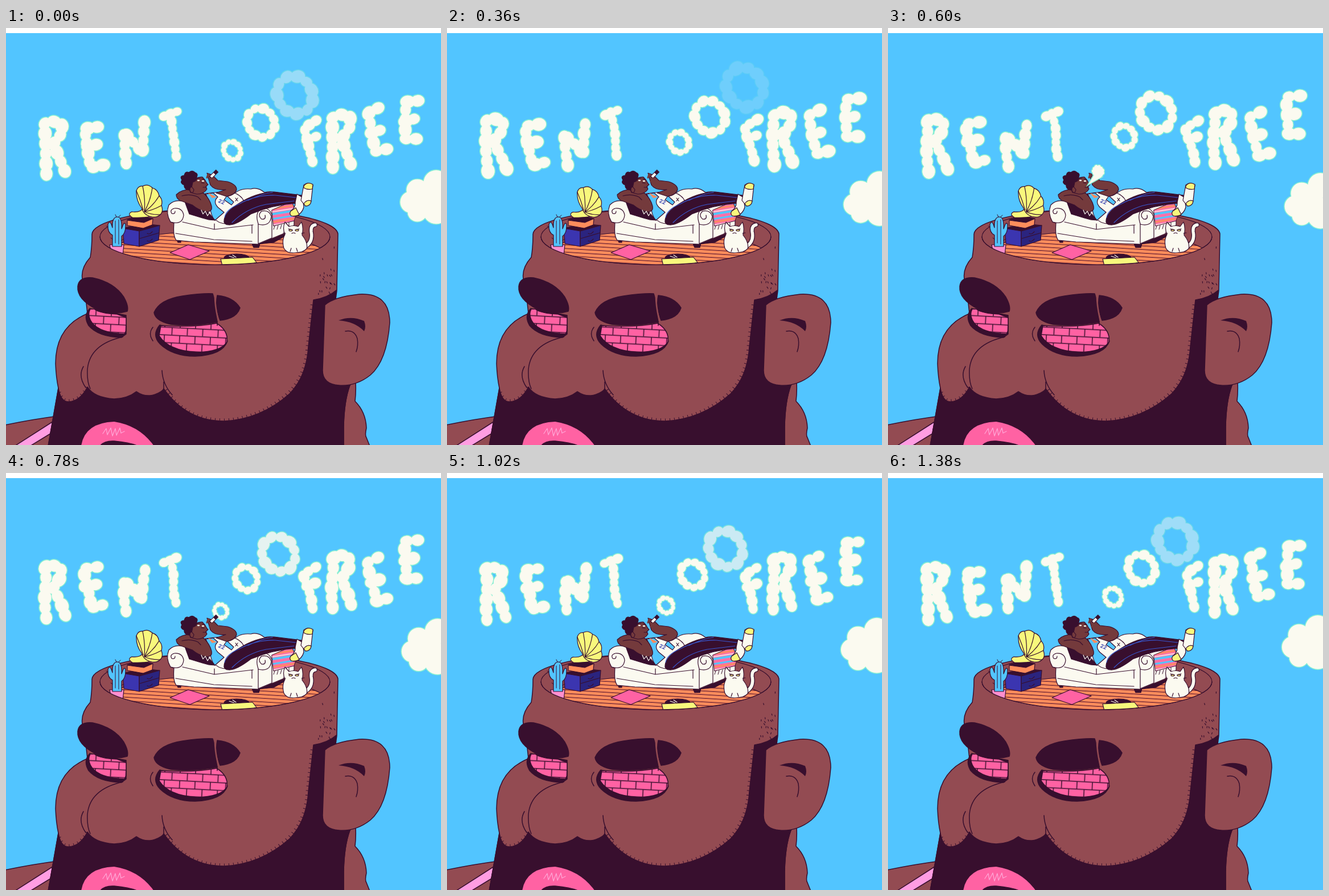
An HTML page for the animation above (1.44 s loop, 764x733 px).

```html
<!DOCTYPE html>
<html lang="en">
<head>
<meta charset="utf-8">
<title>Rent free</title>
<style>
html, body { margin: 0; width: 100%; height: 100%; overflow: hidden; background: #fff }
svg { display: block; width: 764px; height: 733px }
.art { stroke: #380f2e; stroke-width: 1.5; stroke-linejoin: round; stroke-linecap: round; fill: none }
.room { stroke-width: 1.2 }
.skin { fill: #934b52 } .dark { fill: #380f2e } .cream { fill: #fbfaf0 } .pink { fill: #ff62a3 }
.yellow { fill: #f8f87c } .blue { fill: #52c5ff } .orange { fill: #ff8d5c } .navy { fill: #3b35b0 }
.arm { fill: #743a3c }
.flat { stroke: none }
.smoke path { fill: #fbfaf0; stroke: #86efd2; stroke-width: 3; paint-order: stroke }
</style>
</head>
<body>
<svg viewBox="0 0 764 733">
<defs>
  <pattern id="boards" width="40" height="6.4" patternUnits="userSpaceOnUse" patternTransform="rotate(3.5)">
    <path d="M0 0H40V6.4H0Z" fill="#ff8d5c"/><path d="M0 3H40" stroke="#6b2536" stroke-width="1.3"/>
  </pattern>
  <pattern id="bricks" x="273" y="514" width="27" height="27" patternUnits="userSpaceOnUse" patternTransform="rotate(3 329 545)">
    <path d="M0 0H27V27H0Z" fill="#ff62a3"/>
    <path d="M0 1H27M0 14.500H27M5 1V14.500M18 14.500V27" stroke="#380f2e" stroke-width="1.5"/>
  </pattern>
  <pattern id="stripes" width="30" height="23" y="311" patternUnits="userSpaceOnUse" patternTransform="rotate(-9 468 318)">
    <path d="M0 0H30V23H0Z" fill="#ff70a8"/>
    <path d="M0 1H30M0 16H30" stroke="#52c5ff" stroke-width="4"/>
    <path d="M0 7H30" stroke="#ff8d5c" stroke-width="3"/>
    <path d="M0 12H30" stroke="#fbfaf0" stroke-width="1.5"/>
  </pattern>
  <clipPath id="opening"><path d="M165 300H569V367A202 49 0 0 1 165 367Z"/></clipPath>
</defs>
<path d="M0 9H764V733H0Z" fill="#52c5ff"/>
<g class="smoke" id="back"></g>

<g class="art">
  <!-- shoulders and neck -->
  <path class="skin" d="M-2 698Q45 688 92 682V736H-2Z"/>
  <path d="M15 735L82 692L78 713L42 735Z" fill="#ff9de2"/>
  <path class="skin" d="M614 622Q615 640 613 656Q632 675 633 703Q630 716 633 720L639 735H580V640Z"/>

  <!-- head -->
  <path class="skin" d="M151 364Q151 385 148 403Q131 422 134 441Q140 470 143 502Q87 525 87 590Q88 615 92 633L74 735H593V700Q594 655 604 628L560 620L581 462L583 362A216 45 0 0 0 151 364Z"/>
  <path class="dark" d="M92 633Q96 657 110 657Q130 656 143 631Q155 650 190 652Q214 651 229 639Q245 650 262 644Q275 639 277 634Q317 691 383 691Q447 688 498 643Q528 612 531 560L540 478Q565 474 580 461L562 600L604 628Q594 655 593 700V735H74Z"/>
  <path d="M94 640Q99 655 110 655Q130 654 142 631M281 636Q317 689 383 689Q447 686 496 641Q526 610 529 560L538 480" stroke-width="5" stroke-dasharray="1 7" stroke-linecap="butt"/>
  <g id="stubble" stroke-width="1.2"></g>

  <path class="skin" d="M560 487Q575 473 620 468Q674 465 674 518Q669 585 640 610Q615 630 585 628Q556 626 556 602Q558 540 560 487Z"/>
  <path class="dark flat" d="M584 514Q606 505 629 515Q633 525 629 533Q613 516 584 514Z"/>
  <path d="M596 533Q612 530 617 546Q619 558 615 569"/>

  <path class="dark" d="M147 493Q135 506 145 523Q162 543 203 544L211 538V505Z"/>
  <path fill="url(#bricks)" d="M148 494Q142 505 151 518Q165 536 208 538L211 532V509L195 503Q165 502 155 494Z"/>
  <path class="dark" d="M126 454Q128 437 152 439Q190 447 207 473Q216 489 213 498Q190 505 160 495Q124 477 126 454Z"/>
  <path class="dark" d="M270 522Q255 540 271 556Q293 577 332 577Q381 575 389 550Z"/>
  <path fill="url(#bricks)" d="M272 523Q330 527 370 519Q391 532 388 552Q378 569 335 570Q285 567 269 541Z"/>
  <path class="dark" d="M260 500Q270 477 310 471Q345 466 363 467Q371 490 371 517Q330 525 290 521Q262 515 260 500Z"/>
  <path class="dark" d="M371 470Q400 473 411 492Q405 511 376 514Q367 490 371 470Z"/>
  <path d="M367 466Q366 485 373 515" stroke="#934b52" stroke-width="2.5"/>
  <path d="M371 516V523M258 526Q249 537 258 550M136 595Q126 612 140 632M205 543Q147 556 143 600Q142 622 148 634M274 602Q275 626 292 645M277 634V622"/>
  <path class="pink flat" d="M132 735Q138 694 190 692Q235 699 260 735Z"/>
  <path class="dark" d="M165 735Q172 725 190 726Q220 729 232 735Z"/>
  <path d="M170 713L176 704L178 715L184 703L187 717L192 704L194 716L200 703L202 712L208 709" stroke="#ffa5d5" stroke-width="1.300"/>
</g>

<g class="art room">
  <ellipse class="skin" cx="367" cy="367" rx="202" ry="49"/>
  <g clip-path="url(#opening)">
    <ellipse cx="367" cy="405" rx="200" ry="48" fill="url(#boards)"/>
    <path class="pink" d="M288 395L320 381L357 392L323 407Z"/>
    <ellipse class="dark" cx="405" cy="404" rx="22" ry="7"/>
    <path d="M392 401L401 404M398 399L404 403" stroke="#fbfaf0"/>
    <path class="yellow" d="M377 406L433 403L440 412L420 418H380Z"/>
    <path fill="#ff8fcf" d="M182 381H207L205 400H186Z"/>
  </g>
  <path d="M165 367A202 49 0 0 0 569 367"/>

  <!-- cabinet and gramophone -->
  <path class="dark" d="M205 352L240 344L270 347L234 357Z"/>
  <path class="navy" d="M205 352L234 357V384L207 379Z"/>
  <path fill="#2b247f" d="M234 357L270 347L268 373L234 384Z"/>
  <path d="M235 370L269 360M248 361Q252 364 257 358M248 374Q252 377 257 371"/>
  <path class="dark" d="M213 337L236 330L258 335L242 342Z"/>
  <path class="orange" d="M213 338L242 342L258 335L257 346L241 352L213 347Z"/>
  <g id="horn">
    <path class="yellow" d="M256 331Q240 334 222 333Q212 327 221 323Q237 325 242 315L250 326Z"/>
    <path class="yellow" d="M229 286Q232 277 240 278Q249 273 257 281Q267 284 269 295Q276 302 273 312Q277 322 271 328Q264 335 252 331Q241 327 238 316Q228 303 229 286Z"/>
    <path d="M243 323Q245 301 240 278M243 323Q254 303 257 281M243 323Q259 312 269 295M243 323Q259 320 273 312M243 323Q257 329 271 328M241 320Q236 302 229 286"/>
  </g>

  <!-- cactus -->
  <path class="blue" d="M187 384V364Q178 360 179 345Q182 338 185 345L187 351Q186 332 196 332Q204 333 203 353L206 345Q210 340 210 348Q210 361 203 366V384Z"/>
  <path d="M192 339V378M198 337V380M194 332L192 328M198 332L201 329M179 350L176 348M187 371L184 369M203 373L207 371" stroke-width="1"/>

  <!-- sofa -->
  <path class="dark" d="M300 372H307V377H302ZM432 379H446L444 386H435ZM443 380L490 362L504 358L470 377Z"/>
  <path class="cream" d="M289 341Q280 326 286 311Q295 302 307 304L316 298Q345 290 398 295Q408 281 430 283Q442 279 454 289Q472 285 484 295L506 330V346L498 357L443 380L330 376L299 373Q293 366 295 343Z"/>
  <path d="M289 341Q310 347 312 329Q310 316 296 317Q287 319 291 326Q297 328 297 322M310 341L366 354L434 346M432 347V361M366 344V354M298 361L365 372L432 375"/>
  <path class="dark" d="M314 305L350 318L367 338L356 337L345 334L322 327Z"/>
  <path class="cream" d="M443 379V344Q437 326 447 318Q461 313 467 328V369Z"/>
  <path d="M443 345Q464 350 466 331Q462 319 449 322Q441 329 449 336Q457 337 455 329"/>
  <path fill="url(#stripes)" stroke-width="1" d="M467 320L502 305L510 326L506 339L470 348Z"/>
  <path d="M472 348L470 354M478 347L476 354M484 346L482 353M490 344V351M497 342V349" stroke-width="1"/>

  <!-- lounging man -->
  <path class="cream" d="M350 291L377 288L404 291Q418 298 419 310L390 344Q373 345 364 333Z"/>
  <path class="blue" d="M351 292L364 290L372 297Q363 305 372 315L383 324L367 338Q359 330 358 310ZM388 295L400 306L396 311L383 302Z"/>
  <path class="orange flat" d="M355 290L370 297L362 299Z"/>
  <text class="flat" x="372" y="306" transform="rotate(24 372 306)" style="font:bold 9px Inter,sans-serif;fill:#3b45b0">22</text>
  <path d="M403 299L407 304M407 299L403 304"/>
  <path class="dark" d="M383 341Q382 325 408 309Q438 289 471 288L519 294L511 308Q470 310 430 327Q404 347 391 346Q384 346 383 341Z"/>
  <path d="M384 333Q386 319 410 309Q440 293 473 294L509 298M397 342Q422 317 457 310L506 304M425 303Q450 291 468 289" stroke="#3757d0"/>
  <path class="cream" d="M511 292L521 298L523 315Q520 326 509 331Q496 331 500 322Q509 315 508 306Z"/>
  <path class="yellow" d="M500 322L509 316L515 328Q507 332 501 330Q497 327 500 322Z"/>
  <path class="cream" d="M523 276Q531 269 539 276L536 303Q536 312 526 313L518 303Z"/>
  <path class="yellow" d="M523 278Q529 269 539 275L538 283Q530 285 523 281ZM523 309Q528 301 536 304Q535 313 526 313Z"/>
  <path class="arm" d="M299 293Q309 282 333 284L348 291Q358 301 361 313Q363 323 352 323Q339 321 327 311L305 303Q299 299 299 293Z"/>
  <path d="M309 295Q324 291 337 297L342 302"/>
  <path d="M343 320L346 327L350 322L354 330L358 324" stroke="#fbfaf0"/>
  <path class="arm" d="M324 274Q333 261 345 262L350 268Q353 274 355 275L351 279L353 283Q348 292 335 292L324 289Q320 281 324 274Z"/>
  <path class="dark" d="M326 281L321 285Q312 283 313 276Q305 273 309 267Q304 260 313 259Q315 251 321 254Q327 249 332 254Q338 256 335 262Q336 269 328 271Z"/>
  <path class="arm" d="M326 279Q321 281 324 288Q329 292 330 284Z"/>
  <ellipse class="cream flat" cx="338" cy="268" rx="2.2" ry="1.3"/><ellipse class="cream flat" cx="346" cy="269" rx="2.2" ry="1.3"/>
  <path d="M334 265L341 264M344 265L349 267M343 272L348 273M346 280L352 280" stroke-width="1"/>
  <path class="arm" d="M353 255L359 257L366 262L372 268L389 270Q405 275 405 284Q402 294 387 296L369 290L386 284Q366 286 359 276L356 266Z"/>
  <path d="M359 263L371 251" stroke-width="6.500" stroke-linecap="butt"/>
  <path d="M360 262L366 256" stroke="#fbfaf0" stroke-width="4.500" stroke-linecap="butt"/>
  <path d="M355 257L353 263M361 264L358 270" stroke="#743a3c" stroke-width="3"/>

  <!-- cat -->
  <path d="M523 386Q540 377 536 358Q535 347 543 346" stroke-width="8"/>
  <path d="M523 386Q540 377 536 358Q535 347 543 346" stroke="#fbfaf0" stroke-width="5.500"/>
  <path class="cream" d="M490 341L497 349Q506 346 513 349L519 341Q523 351 520 364Q531 378 528 388Q522 395 508 395Q493 397 488 387Q484 373 490 363Q485 352 490 341Z"/>
  <ellipse class="yellow" cx="500" cy="355.500" rx="3" ry="1.500"/><ellipse class="yellow" cx="511" cy="355.500" rx="3" ry="1.500"/>
  <path d="M496 353L503 355M508 355L515 353M502 361Q505 359 508 361M491 361L487 360M519 361L524 360M499 393L501 387M512 393L510 387"/>
</g>
<g class="smoke" id="front"></g>
</svg>
<script>
const LOOP = 1440, STEP = 60, TAU = Math.PI * 2;
const $ = id => document.getElementById(id);
const add = (parent, d = '') => {
  const path = document.createElementNS('http://www.w3.org/2000/svg', 'path');
  path.setAttribute('d', d);
  return parent.appendChild(path);
};
const draw = (path, d) => path.setAttribute('d', d);

// ellipse subpath whose long axis points along angle a
function blob(x, y, rx, ry = rx, a = 0) {
  const dx = rx * Math.cos(a), dy = rx * Math.sin(a);
  const arc = `a${rx} ${ry} ${a * 360 / TAU} 1 1 `;
  return `M${x - dx} ${y - dy}${arc}${2 * dx} ${2 * dy}${arc}${-2 * dx} ${-2 * dy}`;
}

// centre strokes, half width, bob height, time of the lowest point
const letters = [
  ['M71 256L68 168L82 164L98 169L99 184L83 204L103 251', 11.5, 3.5, 1170],
  ['M160 174L138 177L148 246L170 241M143 208L158 205', 11, 4.5, 0],
  ['M211 237L207 182L240 220L243 166', 10.5, 3, 650],
  ['M278 155L300 147M289 152L299 225', 8.5, 3, 1020],
  ['M544 163L524 176L538 234M530 196L544 191', 9.5, 3, 1000],
  ['M574 244L573 158L588 152L604 156L605 173L589 195L605 238', 11.5, 4, 0],
  ['M653 141L637 150L648 217L668 213M643 184L656 180', 11, 4, 740],
  ['M723 128L702 130L701 195L720 195M702 164L716 160', 11, 5, 30]
].map(([strokes, size, bob, low]) => {
  const path = add($('front')), points = [];
  for (const part of strokes.split('M').slice(1)) {
    draw(path, 'M' + part);
    const length = path.getTotalLength(), count = Math.round(length / size / 1.55);
    for (let i = 0; i <= count; i++) {
      const at = offset => path.getPointAtLength(i * length / count + offset);
      const p = at(0), q = at(-2), r = at(2);
      points.push([p.x, p.y, Math.atan2(r.y - q.y, r.x - q.x)]);
    }
  }
  return { path, points, size, bob, low };
});
const rings = [0, 1, 2].map(() => add($('back')));
const puff = add($('front'));
const cloud = add($('back'));
const track = [[372, 250, 14], [415, 191, 25], [471, 149, 39], [533, 95, 46]];

function ring(x, y, r, phase, seed) {
  let d = '';
  for (let i = 0; i < 11; i++) {
    const a = i / 11 * TAU + .3, s = r * (.23 + .03 * Math.sin(i * 2.4 + seed + phase));
    const far = r * (.75 + .05 * Math.cos(2 * a - 2));
    d += blob(x + far * Math.cos(a), y + far * Math.sin(a), s * 1.2, s, a + 1.2);
  }
  return d;
}

function render(t) {
  const phase = t / LOOP * TAU;
  for (const { path, points, size, bob, low } of letters) {
    const rest = low / LOOP * TAU, dy = bob * (Math.cos(phase - rest) - Math.cos(rest));
    draw(path, points.map(([x, y, a], i) => {
      const s = size * (1 + .1 * Math.sin(phase + i * 2.1));
      return blob(x + Math.sin(phase + i) - Math.sin(i), y + dy, s * 1.08, s * .92, a);
    }).join(''));
  }

  const age = (t + LOOP - 600) % LOOP / LOOP;
  rings.forEach((path, k) => {
    const [x, y, r] = track[k].map((v, i) => v + (track[k + 1][i] - v) * age);
    draw(path, k || age > .07 && age < .95 ? ring(x, y, r, phase, k) : k ? '' : age > .07 ? ring(x, y, r, phase, k) : '');
    path.setAttribute('opacity', k < 2 ? 1 : 1 - age);
  });
  const puffing = t >= 540 && t <= 660, s = t < 600 ? .6 : 1;
  draw(puff, puffing ? `M352 275L${365 - s} 255L${374 + s} 262Z` + ring(369, 252, 11 * s, phase, 0) + blob(369, 252, 7 * s) : '');

  const drift = 3 * Math.cos(phase - 2.1), sway = 4 * Math.cos(phase - 3.3);
  draw(cloud, [[713, 307, 19], [724, 285, 19], [757, 272, 22], [724, 324, 17], [757, 323, 23], [742, 302, 26]]
    .map(([x, y, r], i) => blob(x + drift, y + 3 + sway + Math.sin(phase + i), r)).join(''));

  const squash = .975 + .025 * Math.cos(phase * 2);
  $('horn').setAttribute('transform', `translate(225 333) scale(${squash}) translate(-225 -333)`);
}

let hairs = '', seed = 7;
const random = () => (seed = seed * 16807 % 2147483647) / 2147483647;
for (let i = 0; i < 24; i++) {
  const y = 384 + 86 * Math.sqrt(random()), x = 547 + 32 * random();
  hairs += `M${x} ${y}l${random() * 3 - 1} 2.5`;
}
add($('stubble'), hairs);

(function tick() {
  render(Math.floor(performance.now() % LOOP / STEP) * STEP);
  requestAnimationFrame(tick);
})();
</script>
</body>
</html>
```
